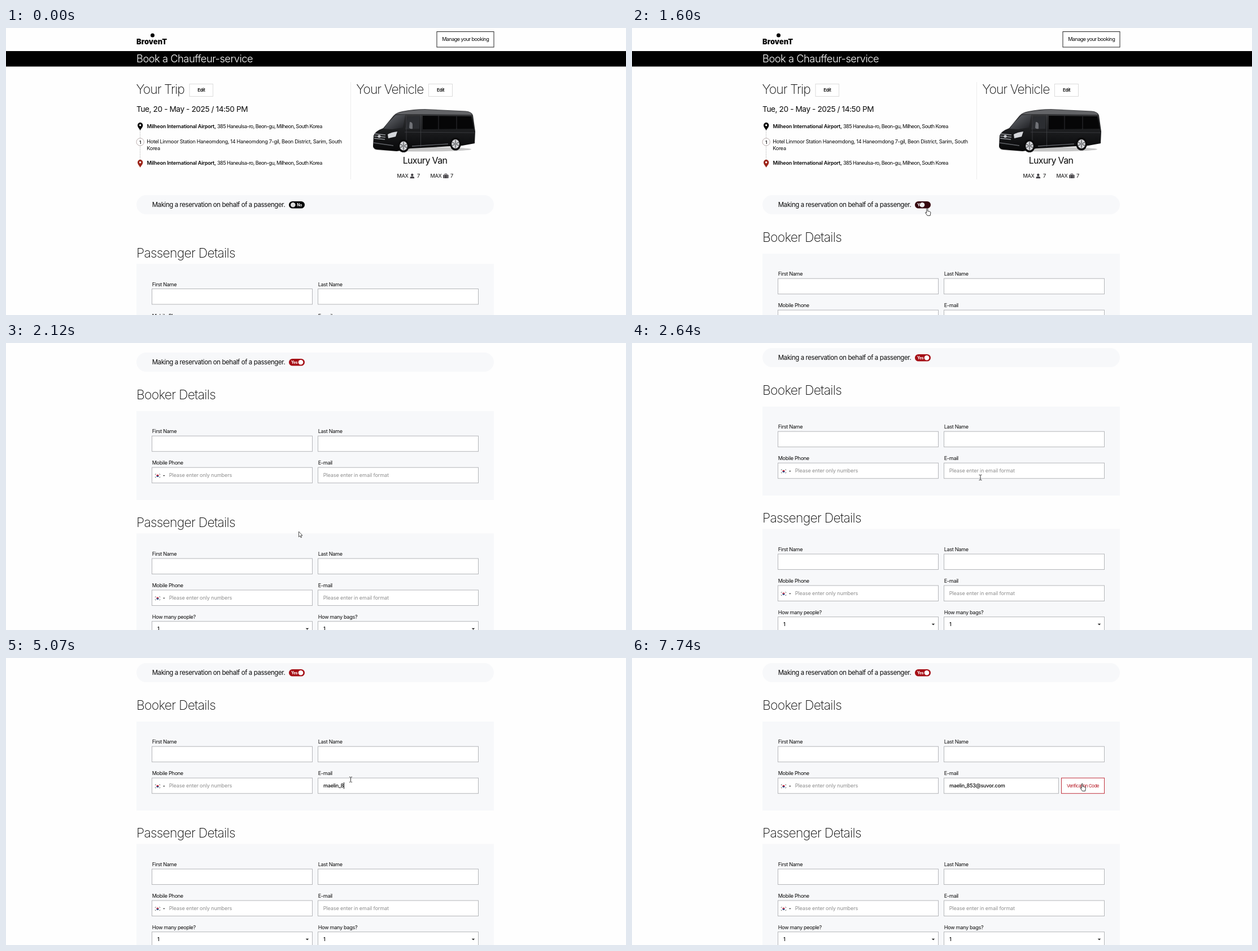
Recreate the animation shown at these times as an HTML page. Size 1098 px wide and 510 px high, loop 8000 ms.

```html
<!DOCTYPE html>
<html lang="en">
<head>
<meta charset="utf-8">
<title>Chauffeur booking form</title>
<style>
html, body { margin: 0; width: 100%; height: 100%; overflow: hidden; background: #fefefe; }
svg { display: block; width: 100%; height: 100%; }
text { font: 400 9.15px Inter, sans-serif; font-optical-sizing: none; letter-spacing: -.035em; fill: #0a0a0a; }
.title { font-size: 22.9px; font-weight: 250; letter-spacing: -.032em; }
.your { letter-spacing: -.042em; }
.bar { font-size: 18.3px; font-weight: 300; letter-spacing: -.026em; fill: #fff; }
.date { font-size: 13.7px; letter-spacing: -.031em; }
.van { font-size: 16px; letter-spacing: -.04em; }
.ask { font-size: 11.44px; }
.edit { font-size: 8px; font-weight: 600; letter-spacing: -.047em; }
.tight { letter-spacing: -.063em; }
.bold { font-weight: 600; letter-spacing: -.026em; }
.brand { font-size: 13px; font-weight: 900; letter-spacing: 0; }
.hint { fill: #8e8e8e; letter-spacing: -.015em; }
.mail { font-weight: 500; letter-spacing: -.03em; }
.code { font-size: 8px; letter-spacing: -.062em; fill: #b5121f; }
.switch { font-size: 6.86px; font-weight: 700; fill: #fff; }
.mid { text-anchor: middle; }
.field { fill: #fff; stroke: #b4b6b9; }
.panel { fill: #f7f8fa; }
.button { fill: #fff; stroke: #dcdcdc; }
</style>
</head>
<body>
<svg viewBox="0 0 1098 510">
  <defs>
    <linearGradient id="paint" x2="0" y2="1">
      <stop offset="0" stop-color="#4c4d50"/><stop offset=".2" stop-color="#2a2b2d"/>
      <stop offset=".6" stop-color="#18191b"/><stop offset="1" stop-color="#070708"/>
    </linearGradient>
    <linearGradient id="glass" x2="1" y2="1">
      <stop offset="0" stop-color="#6b6e73"/><stop offset="1" stop-color="#1b1c20"/>
    </linearGradient>
    <path id="pin" d="M0 7C-1.500 3.500-4.700 1.500-4.700-2.300a4.700 4.700 0 0 1 9.400 0C4.700 1.500 1.500 3.500 0 7Z"/>
    <g id="wheel">
      <ellipse rx="10" ry="11.500" fill="#0b0b0c"/><ellipse rx="6.800" ry="8" fill="#d4d5d8"/>
      <path d="M0-7V7M-6-3L6 3M-6 3L6-3" stroke="#4a4b4e" stroke-width="1.200"/>
      <circle r="2" fill="#8d8f93"/>
    </g>
    <g id="flag">
      <rect x="-5" y="-4" width="10" height="8" fill="#fff"/>
      <path d="M-2.200 0a2.200 2.200 0 0 1 4.400 0Z" fill="#c8283c"/>
      <path d="M-2.200 0a2.200 2.200 0 0 0 4.400 0Z" fill="#1f4787"/>
      <path d="M-4.400-2l1.200-1.400M4.400-2L3.200-3.400M-4.400 2l1.200 1.400M4.400 2L3.200 3.400" stroke="#222"/>
    </g>
  </defs>

  <g id="page">
    <circle cx="259.500" cy="13" r="3.500"/>
    <text class="brand" x="231" y="28.500">BrovenT</text>
    <rect x="763" y="6.500" width="101" height="27.500" fill="#fff" stroke="#222"/>
    <text class="tight mid" x="813.700" y="23.200">Manage your booking</text>
    <path d="M0 41h1098v27.500H0Z"/>
    <text class="bar" x="231" y="61">Book a Chauffeur-service</text>

    <text class="title your" x="230.500" y="117">Your Trip</text>
    <rect class="button" x="325" y="99.500" width="41.500" height="22"/>
    <text class="edit mid" x="345.800" y="113">Edit</text>
    <text class="date" x="231" y="148.500">Tue, 20 - May - 2025 / 14:50 PM</text>
    <path d="M237.500 182v52" stroke="#b5b5b5" stroke-dasharray="1.500 1.500"/>
    <use href="#pin" x="237.700" y="175"/><circle cx="237.700" cy="172.700" r="1.700" fill="#fff"/>
    <use href="#pin" x="237.700" y="241" fill="#9c2418"/><circle cx="237.700" cy="238.700" r="1.700" fill="#fff"/>
    <circle cx="237.700" cy="202.500" r="6.700" fill="#fff" stroke="#a99a9a" stroke-width=".8"/>
    <text class="bold mid" x="237.500" y="205.500" style="font-size:8px">1</text>
    <text class="bold" x="249.500" y="177.500">Milheon International Airport,</text>
    <text class="tight" x="374" y="177.500">385 Haneulsa-ro, Beon-gu, Milheon, South Korea</text>
    <text x="249.300" y="205">Hotel Linmoor Station Haneomdong, 14 Haneomdong 7-gil, Beon District, Sarim, South</text>
    <text x="249.300" y="217">Korea</text>
    <text class="bold" x="249.500" y="243">Milheon International Airport,</text>
    <text class="tight" x="374" y="243">385 Haneulsa-ro, Beon-gu, Milheon, South Korea</text>

    <path d="M610.500 96v173" stroke="#ececec"/>
    <text class="title your" x="620.200" y="117">Your Vehicle</text>
    <rect class="button" x="748.500" y="99.500" width="42" height="22"/>
    <text class="edit mid" x="769.700" y="113">Edit</text>

    <ellipse cx="738" cy="215.500" rx="86" ry="4" fill="#000" opacity=".22"/>
    <path d="M650 210L651 191Q654 183 668 178L686 156Q691 150 702 148Q722 144 742 144L814 147.500Q825 148.500 827 155L831 184L830 205L808 209L716 214L692 219L657 216Q650 215 650 210Z" fill="url(#paint)"/>
    <path d="M690 153Q700 148 742 145L814 148.500Q823 149 825 154L738 153Z" fill="#636467"/>
    <path d="M669 179L675 170L690 155L707 154L703 177L684 180Z" fill="url(#glass)"/>
    <path d="M711 159L732 157V179L707 180Z" fill="#2b2d31"/>
    <path d="M738 156L824 157Q827 167 828 179L738 180Z" fill="#060607"/>
    <path d="M766 156v24M798 157v23M734.500 154v57M706 185l124 1M709 155v58" fill="none" stroke="#45474b" stroke-width=".7"/>
    <path d="M715 167q5 0 5 5v7q-5 1-6-2Z" fill="#707277"/>
    <path d="M676 189q7-4 17-5l-3 9-13 3Z" fill="#d5d7db"/>
    <path d="M652 188l20 2M652 192l20 2M652 196l19 2" stroke="#95979c" stroke-width="1.300"/>
    <circle cx="661" cy="192.500" r="2.600" fill="#c4c6ca"/>
    <path d="M651 204l35 5M719 210l64-4" stroke="#606267" stroke-width="1.300"/>
    <use href="#wheel" x="704" y="209.500"/><use href="#wheel" x="796" y="206"/>

    <text class="van mid" x="742" y="241.300">Luxury Van</text>
    <text x="692.500" y="266">MAX</text><text x="728" y="266">7</text>
    <text x="751.500" y="266">MAX</text><text x="787" y="266">7</text>
    <g fill="#47454a">
      <circle cx="719.300" cy="261" r="2.200"/><path d="M715.500 267.300v-1.300q0-2.300 3.800-2.500 3.800 .2 3.800 2.500v1.300Z"/>
      <rect x="774.200" y="260.800" width="9.400" height="6.200" rx="1"/>
      <path d="M777 260.800v-1.600h3.800v1.600" fill="none" stroke="#47454a"/>
      <path d="M776.500 260.800v6.200M781.300 260.800v6.200" stroke="#aaa" stroke-width=".7"/>
    </g>

    <rect class="panel" x="231" y="297" width="633" height="34" rx="17"/>
    <text class="ask" x="258.700" y="318.300">Making a reservation on behalf of a passenger.</text>
    <rect id="track" x="501" y="308" width="28" height="12.600" rx="6.300"/>
    <text id="switchText" class="switch" y="316.900"></text>
    <circle id="knob" cy="314.300" r="4.300"/>

    <g id="booker"></g>
    <g id="passenger"></g>
  </g>

  <g id="cursor" stroke-linejoin="round">
    <path data-kind="arrow" d="M0 0v9.600l2.200-2 1.500 3.300 1.400-.6L3.600 7.100h2.900Z" fill="#fff" stroke="#222" stroke-width=".8"/>
    <path data-kind="hand" d="M-1.200 1.200q0-1 1-1t1 1v4.200l3.600.8q1.500.4 1.500 2L5.100 13.400h-5L-3.200 8.800q-.6-1.300.6-1.500l1.400 1.200Z" fill="#fff" stroke="#222" stroke-width=".9"/>
    <path data-kind="beam" d="M-2.500-4.700q2 0 2.500 1 .5-1 2.500-1M0-3.700v7.400M-2.500 4.700q2 0 2.500-1 .5 1 2.500 1" fill="none" stroke="#222" stroke-width=".9"/>
  </g>
</svg>
<script>
const LOOP = 8000;
const LEFT = 258.5, RIGHT = 552.5, FIELD_WIDTH = 284;
const EMAIL = 'maelin_853@suvor.com';
const $ = id => document.getElementById(id);

const text = (x, y, content, cls = '') => `<text class="${cls}" x="${x}" y="${y}">${content}</text>`;
const caretDown = (x, y, r) => `<path d="M${x - r} ${y - r / 2}h${2 * r}l${-r} ${r}Z" fill="#222"/>`;
const field = (x, y, label, inner = '', id = '') =>
  text(x + .2, y - 5, label) +
  `<rect class="field" id="${id}" x="${x}" y="${y}" width="${FIELD_WIDTH}" height="27.500"/>` + inner;
const choice = (x, y, label) =>
  field(x, y, label, text(x + 9.5, y + 16.7, '1', 'mail') + caretDown(x + 275, y + 13.5, 2.8));

function contactForm(titleY, panelY, panelHeight, firstRow, title, prefix) {
  const secondRow = firstRow + 56;
  return text(231, titleY, title, 'title') +
    `<rect class="panel" x="231" y="${panelY}" width="633" height="${panelHeight}"/>` +
    field(LEFT, firstRow, 'First Name') + field(RIGHT, firstRow, 'Last Name') +
    field(LEFT, secondRow, 'Mobile Phone',
      `<use href="#flag" x="268.500" y="${secondRow + 14.7}"/>` +
      caretDown(279.8, secondRow + 14.7, 1.8) +
      text(288.7, secondRow + 16.7, 'Please enter only numbers', 'hint')) +
    field(RIGHT, secondRow, 'E-mail',
      `<g id="${prefix}Hint">${text(561.7, secondRow + 16.7, 'Please enter in email format', 'hint')}</g>`,
      prefix + 'Mail');
}

$('booker').innerHTML = contactForm(380, 401, 158, 445.2, 'Booker Details', 'booker') + `
  <text id="typed" class="mail" x="562" y="518"></text>
  <path id="caret" d="M.5 509v11.500" stroke="#111"/>
  <g id="verify"><rect x="760.500" y="501.200" width="76" height="27.500" fill="#fff" stroke="#c0303c"/>
  ${text(798.5, 517.5, 'Verification Code', 'code mid')}</g>`;
$('passenger').innerHTML = contactForm(607, 618.5, 260, 663, 'Passenger Details', 'passenger') +
  choice(LEFT, 774.7, 'How many people?') + choice(RIGHT, 774.7, 'How many bags?');

// Each track lists [start time, values...]; a value holds until the next entry.
const CURSOR = [
  [0, 'none', 0, 0], [260, 'arrow', 434, 309], [520, 'arrow', 492, 320], [780, 'arrow', 520.5, 326.5],
  [1050, 'hand', 523, 321], [1310, 'hand', 523, 320], [1860, 'arrow', 521.5, 332.5],
  [2120, 'arrow', 518.5, 335], [2380, 'arrow', 570, 288], [2640, 'beam', 617, 239],
  [2910, 'beam', 617.5, 234], [3190, 'beam', 610.5, 216], [7470, 'beam', 629.5, 219],
  [7740, 'hand', 797.5, 223]
];
const SCROLL = [[0, 0], [1860, 8], [2120, 280], [2380, 288]];
const TYPED = [[0, 0], [3990, 2], [4280, 3], [4540, 6], [4810, 7], [5070, 8], [5340, 10],
  [5600, 11], [5860, 12], [6130, 14], [6400, 16], [6680, 18], [6940, 20]];
const CARET = [[0, false], [2910, true], [3460, false], [3990, true], [7210, false]];
// Track colour, label, label x, knob x, knob colour
const SWITCH = [
  [0, '#000', 'No', 515.3, 508.3, '#dcdcdc'],
  [1600, '#35060d', 'Yes', 505, 514, '#eee'],
  [1860, '#a50f16', 'Yes', 505, 522, '#fff']
];
const at = (track, time) => track.findLast(entry => entry[0] <= time).slice(1);
const show = (element, visible) => element.style.display = visible ? '' : 'none';
const set = (id, attributes) => {
  for (const name in attributes) $(id).setAttribute(name, attributes[name]);
};

function render(time) {
  const [scroll] = at(SCROLL, time);
  const [count] = at(TYPED, time);
  const [caretOn] = at(CARET, time);
  const [trackColor, label, labelX, knobX, knobColor] = at(SWITCH, time);
  const [kind, x, y] = at(CURSOR, time);
  const forPassenger = time >= 1600, complete = count === EMAIL.length;

  set('page', { transform: `translate(0 ${-scroll})` });
  set('track', { fill: trackColor });
  set('knob', { cx: knobX, fill: knobColor });
  set('switchText', { x: labelX });
  $('switchText').textContent = label;
  show($('booker'), forPassenger);
  set('passenger', { transform: `translate(0 ${forPassenger ? 0 : -199.5})` });

  $('typed').textContent = EMAIL.slice(0, count);
  show($('bookerHint'), !count);
  show($('verify'), complete);
  set('bookerMail', { width: complete ? 203 : FIELD_WIDTH });
  const typedWidth = count ? $('typed').getComputedTextLength() : 0;
  set('caret', { transform: `translate(${Math.round(562 + typedWidth)} 0)` });
  show($('caret'), caretOn);

  set('cursor', { transform: `translate(${x} ${y})` });
  for (const shape of $('cursor').children) show(shape, shape.dataset.kind === kind);
}

const start = performance.now();
function tick() {
  render((performance.now() - start) % LOOP);
  requestAnimationFrame(tick);
}
tick();
</script>
</body>
</html>
```
